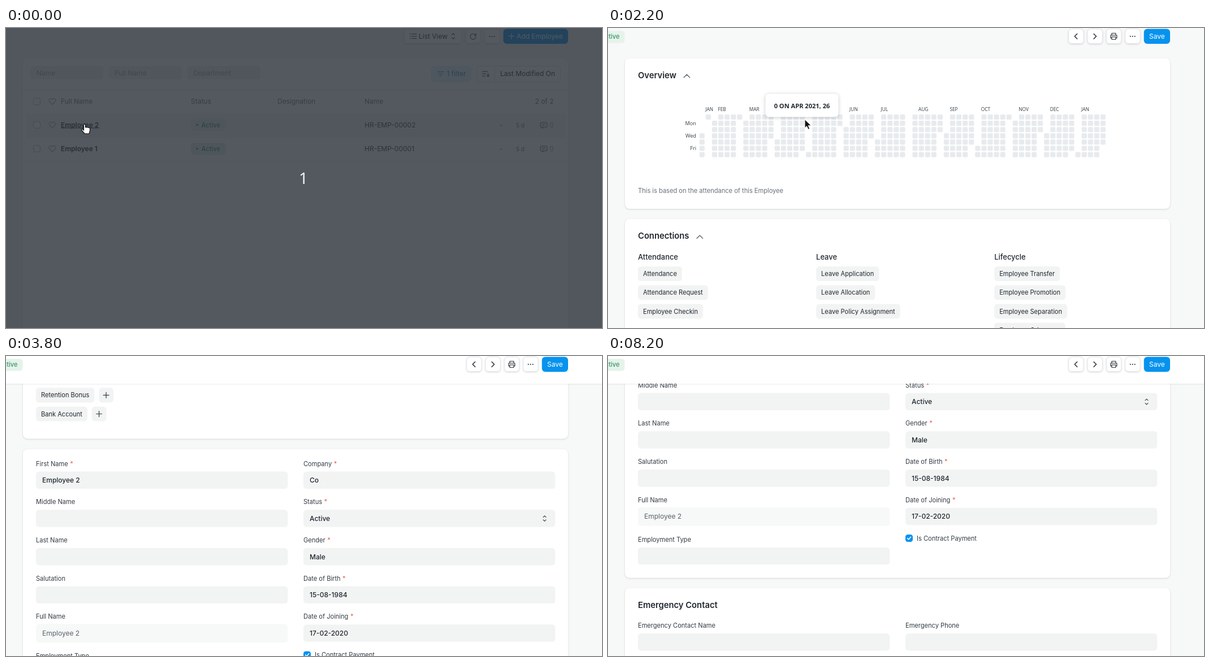
These frames come from a looping animation (1054 px wide and 531 px high, 9400 ms). An HTML page with a canvas:

```html
<!DOCTYPE html>
<html lang="en">
<head>
<meta charset="utf-8">
<title>Employee form</title>
<style>
  html, body { margin: 0; width: 100%; height: 100%; overflow: hidden; background: #f7f8f8; }
  canvas { display: block; }
</style>
</head>
<body>
<canvas id="stage" width="1054" height="531"></canvas>
<script>
const W = 1054, H = 531, LOOP = 9400;
const ctx = document.getElementById('stage').getContext('2d');

const PAGE = '#f7f8f8', FILL = '#f2f3f3', LINE = '#e9ecee', BORDER = '#dfe2e4';
const INK = '#1f272e', SOFT = '#333c44', MUTED = '#687178', FAINT = '#98a0a6';
const BLUE = '#0693ee', GREEN = '#38946a', GREEN_BG = '#e5f3eb';
const UI = 'Inter, sans-serif', CHART = '"Open Sans", sans-serif';
const SMALL = 11.08, BASE = 12, MEDIUM = 12.92, LARGE = 14.77;

const ICON = {
  list: 'M-2.5-4H6M-2.5 0H6M-2.5 4H6M-5.5-4h1M-5.5 0h1M-5.5 4h1',
  updown: 'M-2.5-2.3L0-4.8 2.5-2.3M-2.5 2.3L0 4.8 2.5 2.3',
  refresh: 'M4.6-2A5 5 0 1 0 5 .8M5-5V-1.8H1.8',
  plus: 'M-5 0H5M0-5V5',
  filter: 'M-5.5-3.5H5.5M-3.5 0H3.5M-1.5 3.5H1.5',
  sort: 'M-6-4H3M-6 0H0M-6 4H-1M4-1V5M1.8 2.8L4 5 6.2 2.8',
  heart: 'M0 5.5L-5 .5C-8-3-3-7.5 0-3.5 3-7.5 8-3 5 .5Z',
  comment: 'M-4-5H4Q6-5 6-3V1.5Q6 3.5 4 3.5H0L-2.5 5.5V3.5H-4Q-6 3.5-6 1.5V-3Q-6-5-4-5ZM-3-2H3M-3 .7H1',
  left: 'M2-4.5L-2.5 0 2 4.5',
  right: 'M-2-4.5L2.5 0-2 4.5',
  print: 'M-3.5-2V-5.5H3.5V-2M-3.5 3H-5.5V-2H5.5V3H3.5M-3.5 1H3.5V5.5H-3.5Z',
  up: 'M-5.3 2.6L0-2.6 5.3 2.6',
  check: 'M-3 0L-.8 2.3 3-2.2',
  arrow: 'M0 0V15L3.5 11.8 6 17.5 8.6 16.4 6.2 10.8H11Z',
  hand: 'M-1.5 1Q0-.8 1.5 1V6Q3 4.8 4.2 6 5.6 5 6.8 6.5 9 5.8 9.5 8V12L8 17H0L-5.5 10.5Q-5.2 8.5-3.2 9.2L-1.5 11Z'
};
for (const name in ICON) ICON[name] = new Path2D(ICON[name]);

// Text is placed by the vertical centre of its capitals.
function text(str, x, y, size = BASE, weight = 400, color = INK, align = 'left', family = UI) {
  ctx.font = `${weight} ${size}px ${family}`;
  ctx.fillStyle = color;
  ctx.textAlign = align;
  ctx.fillText(str, x, y + size * .364);
  return ctx.measureText(str).width;
}

function box(x, y, w, h, r, fill, stroke) {
  ctx.beginPath();
  ctx.roundRect(x, y, w, h, r);
  ctx.fillStyle = fill;
  ctx.fill();
  if (stroke) {
    ctx.strokeStyle = stroke;
    ctx.lineWidth = 1;
    ctx.stroke();
  }
}

function raised(x, y, w, h, r, blur = 3, alpha = .16) {
  ctx.save();
  ctx.shadowColor = `rgba(25,39,52,${alpha})`;
  ctx.shadowBlur = blur;
  ctx.shadowOffsetY = 1;
  box(x, y, w, h, r, '#fff');
  ctx.restore();
}

function icon(name, x, y, color = SOFT, width = 1.1, fill) {
  ctx.save();
  ctx.translate(x, y);
  ctx.lineWidth = width;
  ctx.lineJoin = ctx.lineCap = 'round';
  ctx.strokeStyle = color;
  if (fill) {
    ctx.fillStyle = fill;
    ctx.fill(ICON[name]);
  }
  ctx.stroke(ICON[name]);
  ctx.restore();
}

function dots(x, y) {
  for (const dx of [-4, 0, 4]) box(x + dx - 1, y - 1, 2, 2, 1, INK);
}

function button(x, w, y = 1.5) {
  raised(x, y, w, 26.5, 6);
  box(x + .5, y, w - 1, 26, 6, '#fff', BORDER);
}

function hline(x, y, w) {
  ctx.fillStyle = LINE;
  ctx.fillRect(x, y, w, 1);
}

function listRow(y, number) {
  const name = `Employee ${number}`;
  const width = text(name, 97, y, BASE, 600);
  if (number === 2) {
    ctx.fillStyle = INK;
    ctx.fillRect(97, y + 5, width, 1);
  }
  checkbox(54.5, y, false);
  icon('heart', 82, y, FAINT);
  box(327, y - 10.5, 62, 21.5, 5.5, GREEN_BG);
  box(336.2, y - 1.6, 3.4, 3.4, 1.7, GREEN);
  text('Active', 345.5, y, SMALL, 500, GREEN);
  text(`HR-EMP-0000${number}`, 634, y + .5, BASE, 400, SOFT);
  text('-', 872.5, y + .5, BASE, 400, MUTED);
  text('5 d', 902, y + .5, 10.15, 400, MUTED);
  icon('comment', 951, y + .5, MUTED);
  text('0', 961.5, y, SMALL, 400, FAINT);
  hline(35, y + 21.5, 955);
}

function drawList() {
  button(703, 103);
  icon('list', 720, 14.5);
  text('List View', 730, 14.5, BASE, 400, INK);
  icon('updown', 791, 14.5);
  button(812, 27.5);
  icon('refresh', 826, 15);
  button(846, 27.5);
  dots(859.5, 15);
  box(879.5, 1.5, 114.5, 26.5, 6, BLUE);
  icon('plus', 894, 14.5, '#fff', 1, null);
  text('Add Employee', 903, 14.5, BASE, 400, '#fff');

  raised(30, 53.5, 964, 520, 8);
  ['Name', 'Full Name', 'Department'].forEach((label, i) => {
    box(43 + i * 138.6, 67, 129.5, 24, 6, FILL);
    text(label, 54 + i * 138.6, 79.5, BASE, 400, FAINT);
  });
  box(752, 67, 71, 28.5, 6, '#e3f1fb');
  icon('filter', 768.5, 81, '#3a93d0');
  text('1 filter', 779.5, 81, BASE, 400, '#2b86c5');
  box(832.5, 67.5, 148, 28, 6, '#fff', BORDER);
  ctx.fillStyle = BORDER;
  ctx.fillRect(864, 68, 1, 27);
  icon('sort', 848.5, 81);
  text('Last Modified On', 874, 81, BASE);

  hline(30, 109, 964);
  checkbox(54.5, 130, false);
  icon('heart', 82, 130, FAINT);
  text('Full Name', 97, 129.5, BASE, 400, MUTED);
  text('Status', 327, 129.5, BASE, 400, MUTED);
  text('Designation', 480, 129.5, BASE, 400, MUTED);
  text('Name', 634, 129.5, BASE, 400, MUTED);
  text('2 of 2', 968.5, 129.5, BASE, 400, MUTED, 'right');
  box(35, 151, 955, 42, 4, PAGE);
  listRow(171.5, 2);
  listRow(213.5, 1);
}

function checkbox(x, y, checked, focused) {
  if (focused) box(x - 7.5, y - 7.5, 15, 15, 4.5, '#a9d6f7');
  box(x - 6, y - 6, 12, 12, 3.5, checked ? BLUE : '#fff', checked ? BLUE : '#b5bcc1');
  if (checked) icon('check', x, y, '#fff', 1.5);
}

// One square per day; each week and each month opens a new column.
function drawHeatmap() {
  const pitch = SMALL, left = 161.7, top = 153;
  const monthLabel = (date, col) => text(
    date.toLocaleString('en', { month: 'short', timeZone: 'UTC' }).toUpperCase(),
    left + (col + 1) * pitch - .5, 143.5, 8.3, 400, SOFT, 'left', CHART);
  const day = new Date(Date.UTC(2021, 0, 27)), end = Date.UTC(2022, 0, 27);
  let col = 0;
  monthLabel(day, col);
  while (day <= end) {
    box(left + col * pitch, top + day.getUTCDay() * pitch, 9.2, 9.2, 2, '#e8ebee');
    day.setUTCDate(day.getUTCDate() + 1);
    if (day.getUTCDay() === 0) col++;
    if (day.getUTCDate() === 1) {
      col++;
      monthLabel(day, col);
    }
  }
  ['Mon', 'Wed', 'Fri'].forEach((name, i) =>
    text(name, 156, 168.5 + i * 2 * pitch, 9.2, 400, SOFT, 'right', CHART));
}

const CONNECTIONS = [
  [['Attendance', 'Attendance', 'Attendance Request', 'Employee Checkin'],
   ['Leave', 'Leave Application', 'Leave Allocation', 'Leave Policy Assignment'],
   ['Lifecycle', 'Employee Transfer', 'Employee Promotion', 'Employee Separation', 'Employee Grievance']],
  [['Shift', 'Shift Request', 'Shift Assignment'],
   ['Expense', 'Expense Claim', 'Travel Request', 'Employee Advance'],
   ['Benefit', 'Employee Benefit Application', 'Employee Benefit Claim']],
  [['Payroll', 'Salary Structure Assignment', 'Salary Slip', 'Additional Salary', 'Timesheet',
    'Employee Incentive', 'Retention Bonus', 'Bank Account'],
   ['Training', 'Training Event', 'Training Result', 'Training Feedback', 'Employee Skill Map'],
   ['Evaluation', 'Appraisal']]
];

function drawConnections(withPlus) {
  let y = 405.7;
  for (const band of CONNECTIONS) {
    band.forEach(([title, ...items], i) => {
      const x = 53 + i * 315.1;
      text(title, x, y, MEDIUM, 500);
      items.forEach((item, k) => {
        const cy = y + 29.4 + k * 33.2;
        ctx.font = `400 ${SMALL}px ${UI}`;
        const w = ctx.measureText(item).width + 18;
        box(x, cy - 13, w, 26, 5.5, FILL);
        text(item, x + 9, cy, SMALL, 400, INK);
        if (withPlus) {
          box(x + w + 8, cy - 13, 25.5, 26, 5.5, FILL);
          icon('plus', x + w + 20.7, cy, SOFT, 1.2);
        }
      });
    });
    y += 73.4 + 33.2 * (Math.max(...band.map(group => group.length)) - 2);
  }
}

function field(x, y, label, value, { required, readOnly } = {}) {
  const w = text(label, x, y, SMALL, 400, SOFT);
  if (required) text('*', x + w + 3.5, y, SMALL, 400, '#e2604f');
  box(x, y + (readOnly ? 13 : 14), 445.3, readOnly ? 33 : 30.5, 5.5, readOnly ? PAGE : FILL);
  if (value) text(value, x + 11, y + 29.3, BASE, readOnly ? 400 : 500, readOnly ? '#59636b' : INK);
}

function drawFields(checked, focused) {
  const L = 53, R = 526, rowY = i => -16.1 + i * 67.7;
  raised(30, -41.6, 964, 434.4, 8);
  field(L, rowY(0), 'First Name', 'Employee 2', { required: true });
  field(L, rowY(1), 'Middle Name');
  field(L, rowY(2), 'Last Name');
  field(L, rowY(3), 'Salutation');
  field(L, rowY(4), 'Full Name', 'Employee 2', { readOnly: true });
  field(L, 324.8, 'Employment Type');
  [['Company', 'Co'], ['Status', 'Active'], ['Gender', 'Male'],
   ['Date of Birth', '15-08-1984'], ['Date of Joining', '17-02-2020']]
    .forEach(([label, value], i) => field(R, rowY(i), label, value, { required: true }));
  icon('updown', 952.5, 81);
  checkbox(532.5, 322.5, checked, focused);
  text('Is Contract Payment', 546, 322.5, SMALL, 400, SOFT);

  raised(30, 410.5, 964, 300, 8);
  text('Emergency Contact', L, 440.7, LARGE, 600);
  field(L, 477.2, 'Emergency Contact Name');
  field(R, 477.2, 'Emergency Phone');
}

function drawFormHeader(t, scrolled) {
  if (scrolled) {
    ctx.save();
    ctx.shadowColor = 'rgba(25,39,52,.18)';
    ctx.shadowBlur = 3;
    ctx.fillStyle = '#fff';
    ctx.fillRect(-5, -5, W + 10, 54);
    ctx.restore();
  }
  const dirty = t >= 5400 && t < 7800;
  const edge = dirty ? 50 : 29.5;
  box(-60, 5, edge + 60, 21.5, 5.5, dirty ? '#fdf0ea' : GREEN_BG);
  text(dirty ? 'Not Saved' : 'Active', edge - 9, 15.3, SMALL, 500, dirty ? '#e07f60' : GREEN, 'right');

  for (let i = 0; i < 4; i++) button(814 + i * 33.4, 27.5);
  icon('left', 827.7, 14.7, INK, 1.4);
  icon('right', 861, 14.7, INK, 1.4);
  icon('print', 894.4, 14.7, INK);
  dots(927.7, 14.7);

  if (t >= 7100 && t < 7500) box(945, -1, 52, 32, 8, '#b5dcf8');
  box(947.7, 1.5, 46.3, 26.5, 6, t >= 7400 && t < 8100 ? '#5cb8f4' : BLUE);
  text('Save', 957, 14.5, BASE, 400, '#fff');
}

function drawForm(t) {
  const scroll = track(SCROLL, t)[0];
  ctx.save();
  ctx.translate(0, -scroll);
  raised(30, 53.5, 964, 266.5, 8);
  text('Overview', 53, 83.3, LARGE, 600);
  icon('up', 139.3, 85);
  drawHeatmap();
  text('This is based on the attendance of this Employee', 53, 288.3, SMALL, 400, MUTED);

  raised(30, 338, 964, 653, 8);
  text('Connections', 53, 368, LARGE, 600);
  icon('up', 162.3, 369.7);
  drawConnections(t >= 2300);

  ctx.translate(0, 1051.2);
  drawFields(t < 5400 || t >= 5900, t >= 5400 && t < 7100);
  ctx.restore();

  drawFormHeader(t, scroll > 0);
  if (t === 2200) {
    raised(278.5, 116.5, 129, 41, 6, 6, .25);
    text('0 ON APR 2021, 26', 343, 138.3, SMALL, 700, INK, 'center', CHART);
  }
}

// Keys are [time, ...values], joined by straight segments.
const SCROLL = [[2900, 0], [3000, 60], [3100, 145.7], [3500, 740], [3700, 740],
  [3800, 844.6], [3900, 844.6], [4100, 1051.2]];
const POINTER = [[1600, 139, 170], [2200, 348, 162], [2300, 420, 250], [4600, 646, 324],
  [4900, 530, 319], [6100, 530, 319], [6300, 878, 118], [6500, 878, 118],
  [6600, 963, 37], [6800, 975, 13]];

function track(keys, t) {
  const next = keys.findIndex(key => key[0] > t);
  if (next === 0) return keys[0].slice(1);
  if (next < 0) return keys[keys.length - 1].slice(1);
  const a = keys[next - 1], b = keys[next];
  const k = (t - a[0]) / (b[0] - a[0]);
  return a.slice(1).map((v, i) => v + (b[i + 1] - v) * k);
}

function drawPointer(t) {
  if ((t >= 2400 && t < 4600) || t >= 7500) return;
  const [x, y] = track(POINTER, t);
  if (t < 1700 || t >= 6800) icon('hand', x, y, '#111', 1.2, '#fff');
  else icon('arrow', x, y, '#fff', 1, '#111');
}

function render(t) {
  ctx.fillStyle = PAGE;
  ctx.fillRect(0, 0, W, H);
  if (t < 1700) drawList();
  else drawForm(t);
  if (t < 300) {
    ctx.fillStyle = 'rgba(42,48,56,.8)';
    ctx.fillRect(0, 0, W, H);
    text('1', 526, 266, 28, 400, '#fff', 'center', CHART);
  }
  drawPointer(t);
}

const start = performance.now();
function frame() {
  const t = (performance.now() - start) % LOOP;
  render(Math.floor(t / 100) * 100);
  requestAnimationFrame(frame);
}
frame();
</script>
</body>
</html>
```
